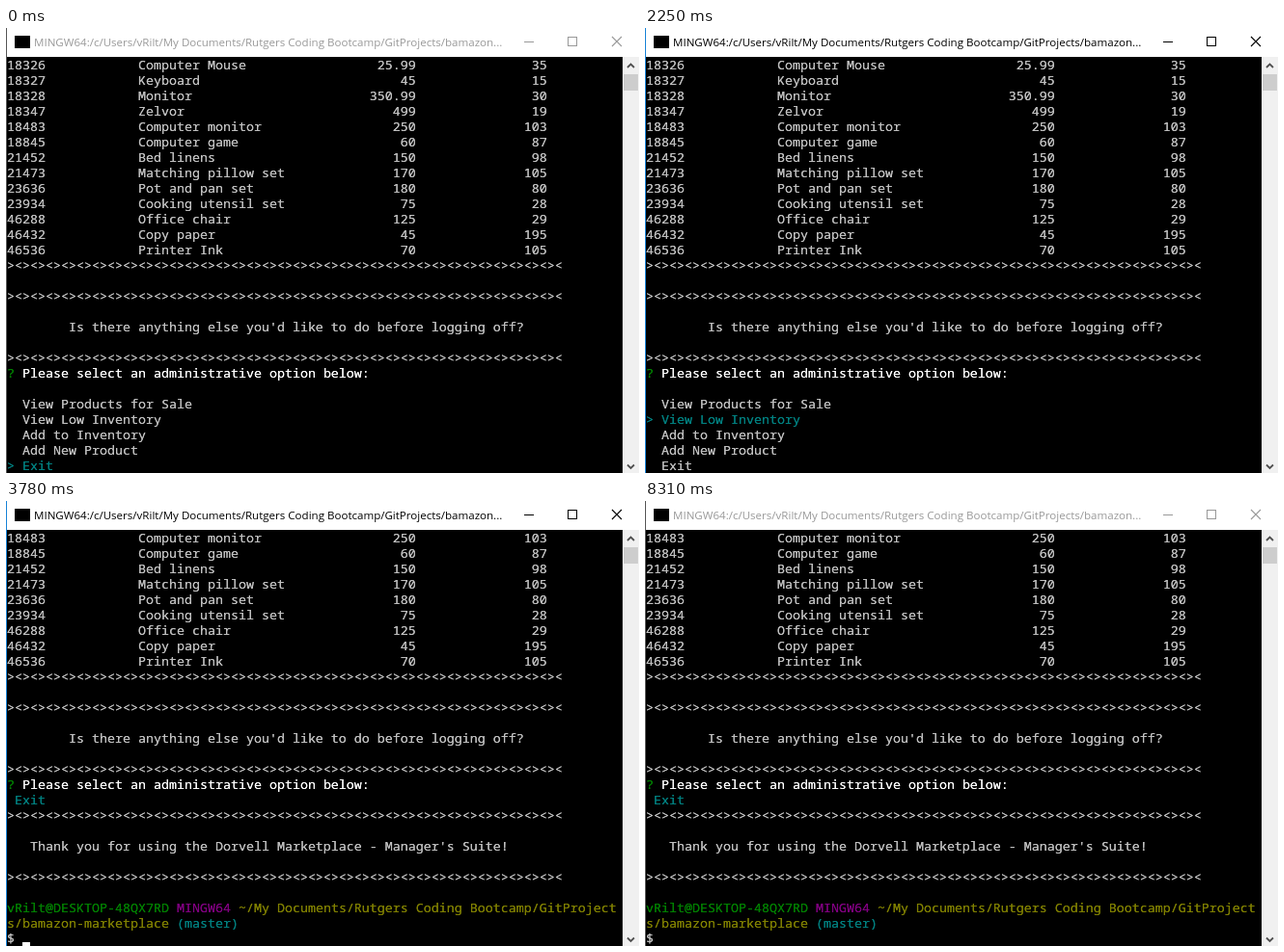
An HTML page for the animation above (8400 ms loop, 656 px wide and 462 px high).

```html
<!DOCTYPE html>
<html lang="en">
<head>
<meta charset="utf-8">
<title>Terminal</title>
<style>
  html, body { margin: 0; width: 100%; height: 100%; overflow: hidden; background: #000; }
  #win { position: absolute; left: 0; top: 0; width: 656px; height: 462px; overflow: hidden;
    background: #000; --ink: #000; --edge: #1883d7; }
  #win.idle { --ink: #999; --edge: #555; }
  svg { position: absolute; left: 0; top: 0; }
  #title { position: absolute; left: 29px; top: 5px; line-height: 20px; white-space: pre;
    font-family: "Open Sans", "Noto Sans", sans-serif; font-size: 11.55px; color: var(--ink); }
  /* The zero-blur shadow firms up the thin strokes. */
  #screen { position: absolute; left: 1px; top: 30px; margin: 0; color: #c0c0c0;
    font: calc(40px / 3)/16px "Noto Sans Mono", "DejaVu Sans Mono", monospace;
    font-variant-ligatures: none; }
  #screen div, #screen span { text-shadow: 0 0 0 currentColor; }
  #screen div { height: 16px; }
  #cursor { position: absolute; left: 17px; top: 458px; width: 8px; height: 4px; background: #fff; }
  .white { color: #fff; }
  .green { color: #008000; }
  .teal { color: #008080; }
  .purple { color: #800080; }
  .olive { color: #808000; }
</style>
</head>
<body>
<div id="win">
  <svg width="656" height="462">
    <rect width="656" height="30" fill="#fff"/>
    <rect x="9" y="8" width="16" height="13" fill="#000"/>
    <g fill="none" style="stroke: var(--ink)">
      <path d="M537 14.5h10M582.5 9.5h9v9h-9z" shape-rendering="crispEdges"/>
      <path d="M628 9l10 10M638 9l-10 10" stroke-width="1.1"/>
    </g>
    <rect x="639" y="30" width="17" height="432" fill="#f0f0f0"/>
    <rect x="640" y="48" width="15" height="17" fill="#cdcdcd"/>
    <path d="M644 41l3.5-3.5 3.5 3.5M644 453.5l3.5 3.5 3.5-3.5" fill="none" stroke="#505050" stroke-width="1.8"/>
    <rect width="1" height="462" style="fill: var(--edge)"/>
  </svg>
  <div id="title">MINGW64:/c/Users/vRilt/My Documents/Rutgers Coding Bootcamp/GitProjects/bamazon...</div>
  <pre id="screen"></pre>
  <div id="cursor"></div>
</div>
<script>
const LOOP = 8400, ROWS = 27;
const $ = id => document.getElementById(id);

const stock = `18326|Computer Mouse|25.99|35
18327|Keyboard|45|15
18328|Monitor|350.99|30
18347|Zelvor|499|19
18483|Computer monitor|250|103
18845|Computer game|60|87
21452|Bed linens|150|98
21473|Matching pillow set|170|105
23636|Pot and pan set|180|80
23934|Cooking utensil set|75|28
46288|Office chair|125|29
46432|Copy paper|45|195
46536|Printer Ink|70|105`.split("\n").map(row => {
  const [id, name, price, count] = row.split("|");
  return ((id.padEnd(17) + name).padEnd(40) + price.padStart(13)).padEnd(60) + count.padStart(10);
});

// A line is a string or a list of [class, text] pieces.
const rule = "><".repeat(36);
const base = [...stock, rule, "", rule, "",
  " ".repeat(8) + "Is there anything else you'd like to do before logging off?", "", rule];
const question = [["green", "? "], ["white", "Please select an administrative option below:"]];
const options = ["View Products for Sale", "View Low Inventory", "Add to Inventory", "Add New Product", "Exit"];
const farewell = [question, [["teal", " Exit"]], rule, "",
  "   Thank you for using the Dorvell Marketplace - Manager's Suite!", "", rule, ""];
const shell = [
  [["green", "vRilt@DESKTOP-48QX7RD "], ["purple", "MINGW64 "],
   ["olive", "~/My Documents/Rutgers Coding Bootcamp/GitProject"]],
  [["olive", "s/bamazon-marketplace "], ["teal", "(master)"]],
  "$"];

const menu = pick => [...base, question, "", ...options.map((text, i) =>
  i === pick ? [["teal", "> " + text]] : "  " + text)];
const thanks = [...base, ...farewell];
const done = [...thanks, ...shell];

const steps = [
  [0, menu(4)], [1410, menu(3)], [1590, menu(2)],
  [1740, base], [1770, menu(1)],
  [1920, base], [1950, menu(0)],
  [2220, base], [2250, menu(1)],
  [2400, base], [2430, menu(2)],
  [2580, base], [2610, menu(3)],
  [2790, base], [2820, menu(4)],
  [3690, base], [3720, thanks], [3780, done]
];
const blinks = [3780, 4200, 4710, 5220, 5700, 6210, 6690, 7200, 7680, 8160];

function draw(lines) {
  $("screen").replaceChildren(...lines.slice(-ROWS).map(line => {
    const row = document.createElement("div");
    if (typeof line === "string") row.textContent = line;
    else for (const [color, text] of line) {
      const piece = document.createElement("span");
      piece.className = color;
      piece.textContent = text;
      row.append(piece);
    }
    return row;
  }));
}

let shown;
function tick() {
  const t = performance.now() % LOOP;
  const lines = steps.findLast(([at]) => at <= t)[1];
  if (lines !== shown) draw(shown = lines);
  $("win").classList.toggle("idle", t < 780 || t >= 8310);
  $("cursor").hidden = blinks.filter(at => at <= t).length % 2 === 0;
  requestAnimationFrame(tick);
}
tick();
</script>
</body>
</html>
```
